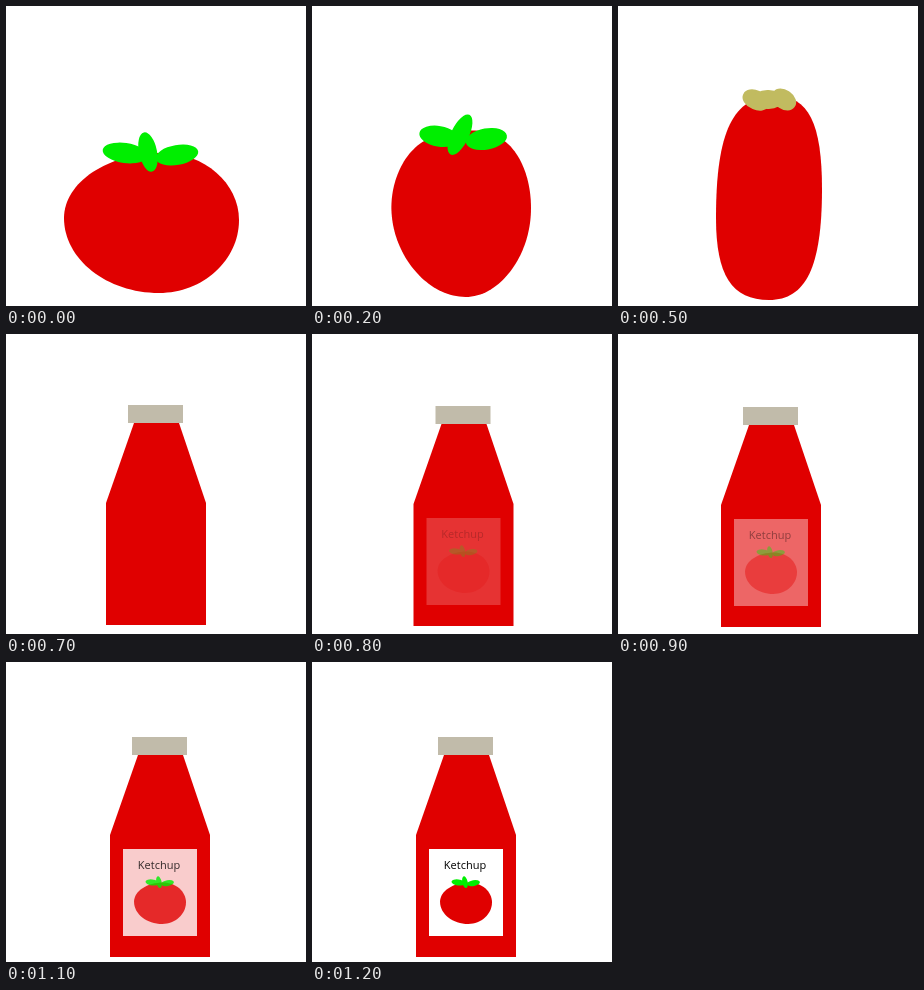
An HTML page for the animation above (1.3 s loop, 300x300 px).

```html
<!DOCTYPE html>
<html lang="en">
<head>
<meta charset="utf-8">
<title>Tomato to ketchup</title>
<style>
  html, body { margin: 0; width: 100%; height: 100%; overflow: hidden; background: #fff; }
  svg { display: block; width: 100vw; height: 100vh; }
  text { font: 11px "Open Sans", "Noto Sans", sans-serif; text-anchor: middle; }
</style>
</head>
<body>
<svg viewBox="0 0 300 300">
  <g id="scene">
    <path id="body" fill="#e00000"/>
    <g id="top"><rect/><rect/><rect/></g>
    <g id="label">
      <rect x="113" y="183" width="74" height="87" fill="#fff"/>
      <text x="149" y="203">Ketchup</text>
      <path id="miniBody" fill="#e00000" transform="translate(106.8 172.8) scale(.297)"/>
      <g id="miniTop" transform="translate(106.8 172.8) scale(.297)"><rect/><rect/><rect/></g>
    </g>
  </g>
</svg>
<script>
const STEP = 100, STEPS = 13, BOTTLE_STEP = 7, SAMPLES = 160;
const $ = id => document.getElementById(id);
const lerp = (a, b, k) => Array.isArray(a) ? a.map((v, i) => lerp(v, b[i], k)) : a + (b - a) * k;

function setAttributes(element, attributes) {
  for (const name in attributes) element.setAttribute(name, attributes[name]);
}

// Rounded outline through its four extremes; fullness 0.55 gives an ellipse.
function blob(left, top, right, bottom, topFullness, bottomFullness) {
  const quarter = (from, to, fullness, startsFlat) => {
    const corner = startsFlat ? [to[0], from[1]] : [from[0], to[1]];
    return `C${lerp(from, corner, fullness)} ${lerp(to, corner, fullness)} ${to}`;
  };
  return `M${top}` + quarter(top, right, topFullness, true)
    + quarter(right, bottom, bottomFullness, false)
    + quarter(bottom, left, bottomFullness, true)
    + quarter(left, top, topFullness, false) + "Z";
}

// Evenly spaced points along an outline, starting at its top.
function sample(d) {
  const path = document.createElementNS("http://www.w3.org/2000/svg", "path");
  path.setAttribute("d", d);
  const length = path.getTotalLength();
  return Array.from({ length: SAMPLES }, (_, i) => {
    const { x, y } = path.getPointAtLength(length * i / SAMPLES);
    return [x, y];
  });
}

const bodyPaths = [
  blob([58, 212], [156, 147], [233, 214], [153, 287], 0.55, 0.55),
  blob([90, 193], [158, 113], [212, 198], [156, 293], 0.7, 0.55),
  blob([98, 212], [157, 90], [204, 183], [151, 294], 0.71, 0.7),
  "M150 89H173L200 169V291H100V169L128 89Z"
];
const bodySamples = bodyPaths.map(sample);

// Each part: centre x, centre y, length, thickness, angle.
const tops = [
  { parts: [[119, 147, 45, 20, 8], [142, 146, 40, 18, 78], [171, 149, 43, 20, -10]],
    round: 1, color: [0, 238, 0] },
  { parts: [[131, 122, 37, 21, 10], [151, 120, 46, 18, 134], [176, 125, 41, 22, -10]],
    round: 1, color: [0, 238, 0] },
  { parts: [[138, 94, 28, 19, 25], [150, 93.5, 30, 19, 180], [166, 93.5, 26, 19, 35]],
    round: 0.95, color: [193, 187, 96] },
  { parts: [[136, 80, 28, 18, 0], [149.5, 80, 28, 18, 180], [163, 80, 28, 18, 0]],
    round: 0, color: [193, 187, 170] }
];

// The lid settles a little before the body does.
const bodyTimes = [0, 3, 5, 7], topTimes = [0, 3, 5, 6.25];

// Current pose, the next one, and the progress between them.
function locate(times, step) {
  const last = times.length - 1;
  if (step >= times[last]) return [last, last, 0];
  const i = times.findIndex(t => t > step) - 1;
  return [i, i + 1, (step - times[i]) / (times[i + 1] - times[i])];
}

function bodyPath(step) {
  const [i, j, k] = locate(bodyTimes, step);
  return k ? `M${lerp(bodySamples[i], bodySamples[j], k).join("L")}Z` : bodyPaths[i];
}

function drawTop(group, step) {
  const [i, j, k] = locate(topTimes, step);
  const from = tops[i], to = tops[j];
  const round = lerp(from.round, to.round, k);
  group.setAttribute("fill", `rgb(${lerp(from.color, to.color, k).map(Math.round)})`);
  lerp(from.parts, to.parts, k).forEach(([x, y, width, height, angle], n) =>
    setAttributes(group.children[n], {
      x: x - width / 2, y: y - height / 2, width, height,
      rx: round * width / 2, ry: round * height / 2,
      transform: `rotate(${angle} ${x} ${y})`
    }));
}

function draw(ms) {
  const step = Math.floor(ms / STEP) % STEPS;
  const late = Math.max(0, step - BOTTLE_STEP);
  $("body").setAttribute("d", bodyPath(step));
  drawTop($("top"), step);
  $("scene").setAttribute("transform", `translate(${Math.min(4, late * 1.5)} ${Math.min(4, late)})`);
  for (const part of $("label").children) part.setAttribute("opacity", late / 5);
}

$("miniBody").setAttribute("d", bodyPaths[0]);
drawTop($("miniTop"), 0);

const start = performance.now();
function tick() {
  draw(performance.now() - start);
  requestAnimationFrame(tick);
}
tick();
</script>
</body>
</html>
```
